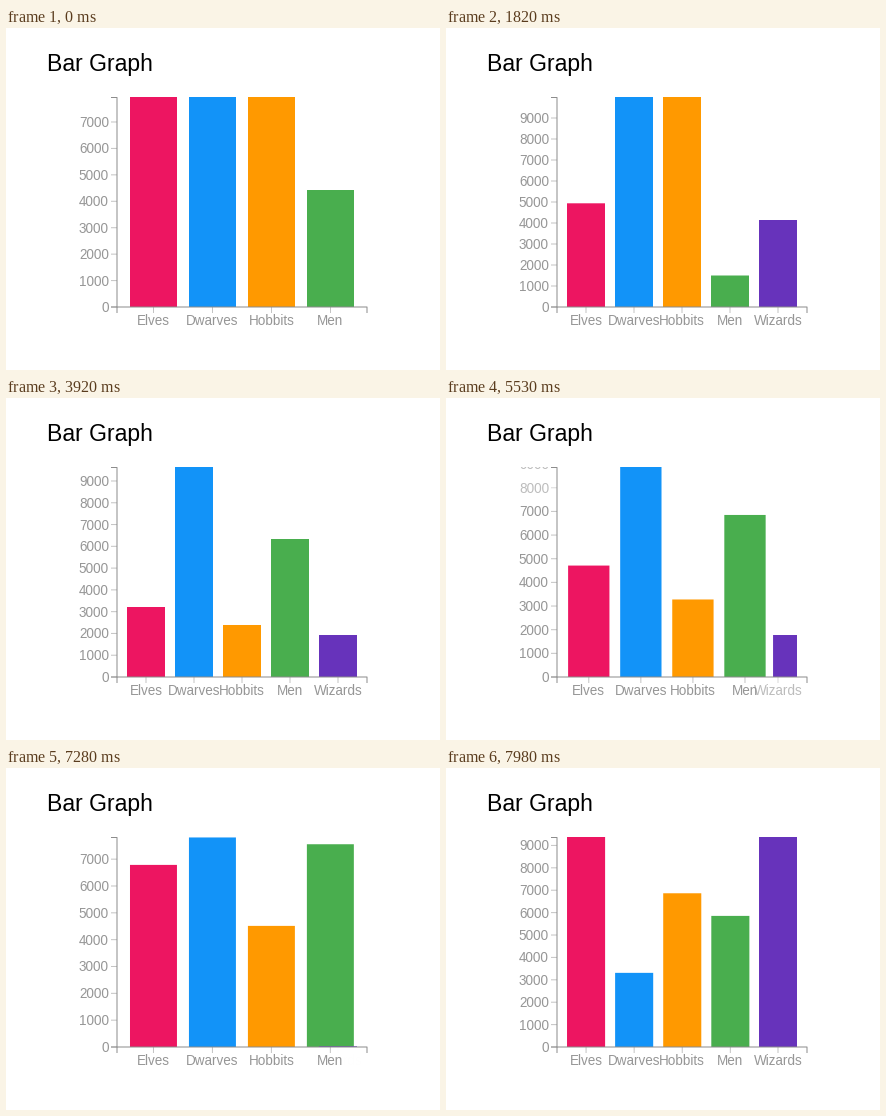
A matplotlib script for the animation above (8 s loop, 434x342 px).

```python
import matplotlib.pyplot as plt
from matplotlib.animation import FuncAnimation
from matplotlib.patches import Rectangle

W, H, DPI = 434, 342, 100
PT = 72 / DPI
LOOP, INTERVAL, STEP = 8000, 20, 70
LEFT, RIGHT, TOP, BASE = 111, 361, 69, 279
DURATION = 900

NAMES = ["Elves", "Dwarves", "Hobbits", "Men", "Wizards"]
COLORS = ["#ed1561", "#1293f8", "#ff9900", "#49ae4e", "#6733bb"]
GREY, AXIS, TICK = "#969696", "#8c8c8c", "#c4c4c4"

# Each state: pixels per thousand, then the top edge of every bar.
STATES = [
    (26.43, [40, 69, 45, 162]),
    (21.00, [175.3, 62, 69, 247.5, 192]),
    (21.78, [209, 69, 227, 141, 237]),
    (26.85, [97, 69, 158, 76]),
    (22.36, [67, 206, 125, 148.5, 67]),
]
STARTS = [921, 3040, 5123, 7195]


def ease(u):
    u = min(max(u, 0), 1)
    return 4 * u**3 if u < 0.5 else 1 - 4 * (1 - u) ** 3


def mix(a, b, p):
    return a + (b - a) * p


def band(count, i):
    """Left edge and width of bar i."""
    return (124 + 59 * i, 47) if count == 4 else (121 + 48 * i, 38)


def bar_box(state, other, i, entering):
    """x, width, top and opacity of bar i, also when the state lacks it."""
    tops = state[1]
    if i < len(tops):
        return (*band(len(tops), i), tops[i], 1)
    x, width = band(5, i)
    if entering or i >= len(other[1]):
        return x, width, BASE, 0
    return x + width, 0, other[1][i], 0


fig = plt.figure(figsize=(W / DPI, H / DPI), dpi=DPI, facecolor="white")
ax = fig.add_axes([0, 0, 1, 1])
ax.set(xlim=(0, W), ylim=(H, 0))
ax.axis("off")


def line(xs, ys, color, z):
    return ax.plot(xs, ys, color=color, lw=PT, zorder=z, snap=False,
                   solid_capstyle="butt")[0]


def label(x, y, text, size=13.5, color=GREY, ha="center", z=5):
    return ax.text(x, y, text, fontsize=size * PT, color=color, ha=ha,
                   va="baseline", family="Liberation Sans", zorder=z)


bars = [ax.add_patch(Rectangle((0, BASE), 0, 0, fc=c, lw=0, snap=False, zorder=2))
        for c in COLORS]
x_ticks = [line([0, 0], [BASE, BASE + 6], TICK, 1) for _ in NAMES]
x_labels = [label(0, 297, name) for name in NAMES]
y_ticks = [line([LEFT - 6, LEFT], [0, 0], TICK, 1) for _ in range(10)]
y_labels = [label(103, 0, str(1000 * k), ha="right") for k in range(10)]

# Mask that clips everything above the plot area.
ax.add_patch(Rectangle((0, 0), W, TOP, fc="white", lw=0, zorder=6))
line([LEFT, LEFT, RIGHT, RIGHT], [BASE + 6, BASE, BASE, BASE + 6], AXIS, 4)
line([LEFT - 6, LEFT, LEFT, LEFT - 6],
     [TOP + 0.5, TOP + 0.5, BASE, BASE], AXIS, 4)
label(41, 43, "Bar Graph", 23, "black", "left", 7)


def tick_count(state):
    return int((BASE - TOP) / state[0]) + 1


def draw(frame):
    t = (frame * INTERVAL + INTERVAL // 2) // STEP * STEP
    k = max(sum(t >= s for s in STARTS) - 1, 0)
    old, new = STATES[k], STATES[k + 1]
    p = ease((t - STARTS[k]) / DURATION)

    for i, bar in enumerate(bars):
        a = bar_box(old, new, i, True)
        b = bar_box(new, old, i, False)
        x, width, top, alpha = (mix(u, v, p) for u, v in zip(a, b))
        bar.set_bounds(x, top, width, BASE - top)
        bar.set_visible(width > 0.05 and BASE - top > 0.05)
        center = x + width / 2 if i < 4 else 332
        x_ticks[i].set_xdata([center, center])
        x_labels[i].set_x(center)
        x_ticks[i].set_alpha(alpha)
        x_labels[i].set_alpha(alpha)

    unit = mix(old[0], new[0], p)
    for n, (tick, text) in enumerate(zip(y_ticks, y_labels)):
        y = BASE - n * unit
        alpha = mix(n < tick_count(old), n < tick_count(new), p)
        tick.set_ydata([y, y])
        text.set_y(y + 5)
        tick.set_alpha(alpha)
        text.set_alpha(alpha)
    return bars + x_ticks + x_labels + y_ticks + y_labels


anim = FuncAnimation(fig, draw, frames=LOOP // INTERVAL, interval=INTERVAL,
                     repeat=True, repeat_delay=0, blit=False)
plt.show()
```
